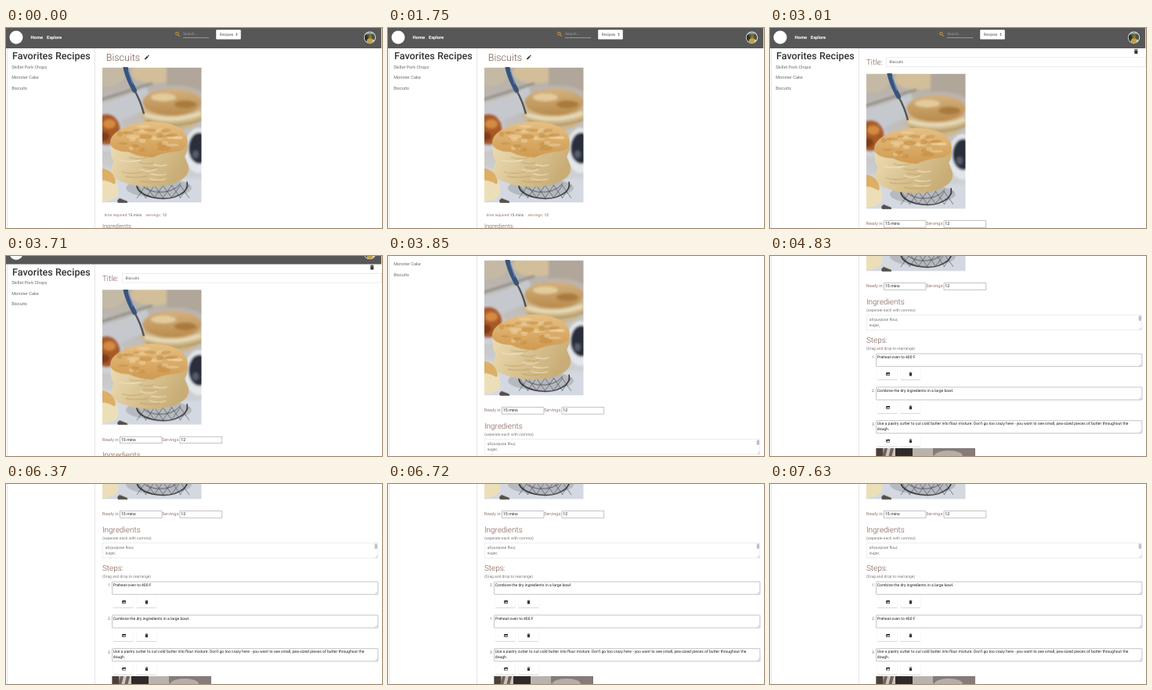
Recreate the animation shown at these times as an HTML page. Size 480 by 256 pixels, loop 8 s.

```html
<!DOCTYPE html>
<html lang="en">
<head>
<meta charset="utf-8">
<title>Recipe editor</title>
<style>
html, body { margin: 0; width: 100%; height: 100%; overflow: hidden; background: #fff; }
svg { display: block; width: 480px; height: 256px; }
text { font-family: Roboto, sans-serif; text-rendering: geometricPrecision; white-space: pre; }
</style>
</head>
<body>
<svg id="stage" viewBox="0 0 480 256" xmlns="http://www.w3.org/2000/svg"></svg>
<script>
const LOOP = 8000, TICK = 70, EDIT_AT = 2380, DROP_AT = 6930, PITCH = 42.8;
const BROWN = '#795548', LABEL = '#93766c', GREY = '#6e6e6e', INK = '#1c1c1c', EDGE = '#9c9c9c';

// Scroll offset of the page: [time, pixels]
const SCROLL = [
  [3570, 0], [3640, 5], [3710, 15.5], [3780, 33], [3850, 53], [3920, 70], [3990, 83],
  [4130, 94], [4270, 102], [4340, 109], [4410, 148], [4480, 188], [4550, 208],
  [4690, 211], [4830, 212]
];

const text = (x, y, size, fill, s, extra = '') =>
  `<text x="${x}" y="${y}" font-size="${size}" fill="${fill}" ${extra}>${s}</text>`;
const heading = (x, y, size, s) => text(x, y, size, BROWN, s, 'font-weight="300"');
const rect = (x, y, w, h, fill, extra = '') =>
  `<rect x="${x}" y="${y}" width="${w}" height="${h}" fill="${fill}" ${extra}/>`;
const oval = (cx, cy, rx, ry, fill, extra = '') =>
  `<ellipse cx="${cx}" cy="${cy}" rx="${rx}" ry="${ry}" fill="${fill}" ${extra}/>`;
const path = (d, fill, extra = '') => `<path d="${d}" fill="${fill}" ${extra}/>`;
const line = (d, stroke, w, extra = '') =>
  path(d, 'none', `stroke="${stroke}" stroke-width="${w}" ${extra}`);
const group = (body, extra = '') => `<g ${extra}>${body}</g>`;
const box = (x, y, w, h, stroke, extra = '') =>
  rect(x, y, w, h, '#fff', `stroke="${stroke}" stroke-width=".6" ${extra}`);
const grip = (x, y) => line(`M${x - 3} ${y}l3-3M${x - 1.4} ${y}l1.4-1.4`, '#888', .4);
const fade = (id, from, to, dir = 'x2="0" y2="1"') =>
  `<linearGradient id="${id}" ${dir}><stop stop-color="${from}"/>` +
  `<stop offset="1" stop-color="${to}"/></linearGradient>`;

function rng(seed) {
  return () => (seed = (seed * 16807) % 2147483647) / 2147483647;
}

function trash(x, y, k) {
  return group(
    rect(-2.3, -2.6, 4.6, .9, '#333') + rect(-.9, -3.1, 1.8, .6, '#333') +
    path('M-2-1.3h4v3.6q0 .7-.7.7h-2.6q-.7 0-.7-.7z', '#333'),
    `transform="translate(${x} ${y}) scale(${k})"`);
}

function defs() {
  return '<defs>' +
    fade('back', '#b4aca2', '#d5d9e0') + fade('crust', '#e6c084', '#cf9a50') +
    fade('crumb', '#ecdcb2', '#c9ad76', 'x2="1" y2=".35"') + fade('blurCrust', '#d3b17e', '#b98a4b') +
    '<filter id="soft"><feGaussianBlur stdDeviation="1.8"/></filter>' +
    '<filter id="faint"><feGaussianBlur stdDeviation=".6"/></filter>' +
    '<clipPath id="frame"><rect width="126.5" height="172.5"/></clipPath>' +
    '<clipPath id="area"><rect x="123" y="287.5" width="352" height="19.2"/></clipPath>' +
    '<clipPath id="face"><circle cx="464.5" cy="12.2" r="6.7"/></clipPath>' +
    '</defs>';
}

function header() {
  return rect(0, 0, 479.2, 26, '#575757') +
    '<circle cx="13" cy="12" r="8.5" fill="#fff"/>' +
    text(31.5, 14, 5.8, '#fff', 'Home', 'font-weight="700"') +
    text(52, 14, 5.7, '#fff', 'Explore', 'font-weight="700"') +
    '<circle cx="218.4" cy="7.2" r="1.8" fill="none" stroke="#e3a52f" stroke-width=".9"/>' +
    line('M219.8 8.6l2.2 2.3', '#e3a52f', 1) +
    text(226.3, 9, 4.7, '#9c9c9c', 'Search...') +
    rect(226, 12.2, 33, .6, '#c0c0c0') +
    rect(268.2, 2.2, 31.6, 12.2, '#fff', 'rx="1"') +
    text(272.8, 10, 5, '#555', 'Recipes') +
    path('M293.3 7.8l1.2-1.5 1.2 1.5zM293.3 8.8l1.2 1.5 1.2-1.5z', '#555') +
    '<circle cx="464.5" cy="12.2" r="7.6" fill="#f2f2f2"/>' +
    group(rect(456, 4, 17, 17, '#4b5540') + rect(456, 4, 17, 4, '#8d9a88') +
      oval(459, 13, 3, 4, '#2b3328') + oval(465, 17, 4.5, 4, '#c4a23c') +
      oval(465, 11, 1.8, 2.4, '#8a7440') + oval(470, 18, 2.5, 3, '#d9d8d0'),
      'clip-path="url(#face)"');
}

function sidebar() {
  return rect(1.4, 26, .7, 600, '#d8d8d8') + rect(113.3, 26, .7, 600, '#dadada') +
    text(8, 40, 12.6, '#333', 'Favorites Recipes', 'font-weight="500"') +
    ['Skillet Pork Chops', 'Monster Cake', 'Biscuits']
      .map((s, i) => text(7.2, 51.7 + i * 13.5, 5.6, GREY, s)).join('');
}

function photo() {
  const rnd = rng(11);
  let spots = '', folds = '', wires = '';
  for (let i = 0; i < 34; i++) {
    const a = rnd() * 6.283, r = Math.sqrt(rnd()) * .9;
    spots += oval(60 + 46 * r * Math.cos(a), 90 + 19 * r * Math.sin(a), 3 + rnd() * 6, 1 + rnd() * 2.5,
      i % 2 ? '#c08638' : '#f2dcae', 'opacity=".5"');
  }
  for (let i = 0; i < 12; i++) {
    const x = 14 + rnd() * 66, y = 112 + i * 3;
    folds += line(`M${x} ${y}q12 ${2 + rnd() * 3} ${16 + rnd() * 14} 0`, i % 2 ? '#c2a268' : '#f8f0d8', 1.3, 'opacity=".65"');
  }
  for (let i = 0; i < 6; i++) {
    const x = 44 + i * 11;
    wires += `M${x} 150l12 17M${x + 12} 150l-12 17`;
  }
  const far =
    rect(-5, -5, 137, 183, 'url(#back)') +
    oval(6, 8, 24, 16, '#c4b9a4') + oval(66, 6, 30, 14, '#d2bf9a') +
    path('M82-5h50v38q-24-14-50-10z', '#b0a69a') +
    path('M-5 46Q30 38 56 24l10 26-46 20-25 2z', '#c5c8cc') +
    line('M-5 42L64 20', '#8f8d88', 3) +
    oval(89, 60, 39, 21, '#cdb687') + oval(89, 44, 38, 17, 'url(#blurCrust)') +
    oval(78, 38, 16, 5, '#e3cb9c') + oval(106, 47, 14, 5, '#a97a3e') +
    line('M54 60q36 12 72-2', '#e6d8b4', 5) + line('M56 68q36 12 72-2', '#a98f60', 2) +
    oval(4, 82, 22, 25, '#cfd2d6') + oval(5, 79, 18, 20, '#a85a28') +
    oval(9, 72, 8, 6, '#d48a42') + oval(2, 88, 7, 6, '#7e3c1c') +
    oval(123, 106, 18, 29, '#e3e6ea') + oval(124, 103, 14, 20, '#2b2e3a') +
    oval(119, 111, 4, 5, '#565d70') +
    path('M-5 124q30 18 137 18v38H-5z', '#d4d9e1');
  const near =
    line('M29-3q2 12 9 26l3 6', '#37547e', 6, 'stroke-linecap="round"') +
    line('M33 3l6 18', '#6d90bd', 1.2) + line('M41 29q8 14 12 30', '#4f5257', 2.4) +
    oval(72, 154, 42, 12, '#a9acb2', 'opacity=".7"') +
    group(line(wires, '#4b4a4c', .8), 'opacity=".8"') +
    line('M44 148q-2 12 20 18 26 5 40-7 6-6 4-13', '#2f2e30', 1.5) +
    line('M50 148q2 8 18 11 22 2 32-11', '#505052', .9) +
    path('M11 98q-2 14 4 22-5 8-3 17 6 10 37 15 33 3 51-8 12-7 10-18-3-8-5-12 5-8 4-16z', 'url(#crumb)') +
    folds +
    path('M10 96q0-13 24-22 28-9 53-2 21 7 22 22 0 11-13 13-17 1-32 8-18-1-30-7-23-1-24-12z', 'url(#crust)') +
    group(spots, 'opacity=".9"') +
    path('M-2 128q14 2 18 14 5 8 4 21-8 8-22 9z', '#ecdfb8') +
    path('M-2 128q14 2 18 14 2 7-1 7-8-5-17-5z', '#dcae66') +
    path('M19 170l3-3 10 4v2H20z', '#55504b');
  return group(group(far, 'filter="url(#soft)"') + group(near, 'filter="url(#faint)"'), 'clip-path="url(#frame)"');
}

function viewPage() {
  return heading(127.8, 42.3, 12.5, 'Biscuits') +
    path('M177 40.4l.3-1.7 3-3 1.4 1.4-3 3zM180.8 35.2l.5-.5q.4-.3.7 0l.7.7q.3.3 0 .7l-.5.5z', '#333') +
    text(125.5, 241.2, 4.9, LABEL, 'time required:') +
    text(155.8, 241.2, 4.9, '#555', '15 mins') +
    text(178.4, 241.2, 4.9, LABEL, 'servings:') +
    text(199.4, 241.2, 4.9, '#555', '12') +
    heading(122.9, 255.6, 7.5, 'Ingredients:');
}

function bowlPhoto() {
  return group(
    rect(135.5, 458, 126.5, 60, '#a59c95') + rect(135.5, 458, 9, 60, '#4a3f3b') +
    rect(144.5, 458, 16, 60, '#c9c3bc') + path('M146 458h4l-3 12h-4zM154 458h4l-3 12h-4z', '#6f625b') +
    rect(160, 458, 22, 60, '#2f2a2a') + rect(182, 458, 26, 60, '#b9b3ae') +
    path('M208 458h54v30q-30-4-54-22z', '#857b78') + oval(228, 468, 18, 7, '#b5aeaa'));
}

function button(x, icon) {
  return rect(x, 18.6, 26, 15.6, '#000', 'opacity=".07" rx="1"') +
    rect(x + .3, 18, 25.4, 15.4, '#fff', 'rx="1"') +
    rect(x + .5, 33.4, 25, .6, '#c8c8c8') + icon;
}

function step(id, lines) {
  const pic = rect(148.2, 24.3, 4.8, 3.8, '#222', 'rx=".4"') +
    path('M148.8 27.5l1.2-1.6.8.9 1-1.4 1 2.1z', '#fff') + '<circle cx="149.6" cy="25.3" r=".4" fill="#fff"/>';
  return group(
    text(134.2, 6.4, 4.95, GREY, id + '.', `id="n${id}" text-anchor="end"`) +
    box(135.6, .3, 339.3, 16.2, EDGE, 'rx=".5"') + grip(474.3, 16) +
    lines.map((s, i) => text(136.8, 6 + i * 7.1, 5.04, INK, s)).join('') +
    button(136.8, pic) + button(166.4, trash(179.5, 26.3, .8)), `id="s${id}"`);
}

function editPage() {
  return trash(467.3, 30, 1) +
    heading(122.9, 47, 9.9, 'Title:') +
    box(148.5, 37.8, 331.2, 11.8, '#e0e0e0') +
    text(152.5, 45.4, 4.95, '#5a5a5a', 'Biscuits') +
    text(122.8, 252.2, 5.5, LABEL, 'Ready in:') +
    box(145.4, 246.7, 53.6, 8.5, EDGE) + text(146.9, 252.3, 5.3, INK, '15 mins') +
    text(199.2, 252.2, 5.5, LABEL, 'Servings:') +
    box(222, 246.7, 53.8, 8.5, EDGE) + text(223.3, 252.3, 5.3, INK, '12') +
    heading(122.9, 273.7, 10, 'Ingredients') +
    text(122.9, 283.2, 4.95, '#777', '(seperate each with comma)') +
    box(123.2, 287.3, 351.6, 19.6, '#e2e2e2') +
    group(['all-purpose flour,', 'sugar,', 'salt,']
      .map((s, i) => text(126.8, 294.9 + i * 7.5, 4.95, GREY, s)).join(''), 'clip-path="url(#area)"') +
    rect(470.6, 288.3, 3.4, 6.8, '#c1c1c1', 'rx="1.6"') + grip(474.3, 306.4) +
    heading(122.9, 322.8, 10, 'Steps:') +
    text(122.9, 332.2, 4.95, '#777', '(Drag and drop to rearrange)') +
    bowlPhoto() +
    step(3, ["Use a pastry cutter to cut cold butter into flour mixture. Don't go too crazy here - you want to see small, pea-sized pieces of butter throughout the", 'dough.']) +
    step(2, ['Combine the dry ingredients in a large bowl.']) +
    step(1, ['Preheat oven to 400 F']);
}

const stage = document.getElementById('stage');
stage.innerHTML = defs() + rect(0, 0, 480, 256, '#fff') +
  group(sidebar() + header() + group(photo(), 'id="photo"') +
    group(viewPage(), 'id="view"') + group(editPage(), 'id="edit"'), 'id="page"');

const el = id => document.getElementById(id);
const move = (id, x, y) => el(id).setAttribute('transform', `translate(${x} ${y})`);
const show = (id, on) => el(id).setAttribute('visibility', on ? 'visible' : 'hidden');

function ease(t, from, to) {
  const p = Math.min(1, Math.max(0, (t - from) / (to - from)));
  return p * p * (3 - 2 * p);
}

function scrollAt(t) {
  const i = SCROLL.findIndex(k => k[0] > t);
  if (i < 0) return SCROLL[SCROLL.length - 1][1];
  if (i === 0) return 0;
  const [t0, a] = SCROLL[i - 1], [t1, b] = SCROLL[i];
  return a + (b - a) * (t - t0) / (t1 - t0);
}

function draw(time) {
  const t = Math.floor(time / TICK) * TICK;
  const editing = t >= EDIT_AT, dropped = t >= DROP_AT;
  show('view', !editing);
  show('edit', editing);
  move('photo', 123, editing ? 58.8 : 50.8);
  move('page', 0, -scrollAt(t));
  move('s1', 0, 336.8 + PITCH * ease(t, 6370, 6720));
  move('s2', 0, 336.8 + PITCH * (1 - ease(t, 6440, 6720)));
  move('s3', 0, 336.8 + PITCH * 2);
  el('n1').textContent = dropped ? '2.' : '1.';
  el('n2').textContent = dropped ? '1.' : '2.';
}

function tick() {
  draw(performance.now() % LOOP);
  requestAnimationFrame(tick);
}
tick();
</script>
</body>
</html>
```
